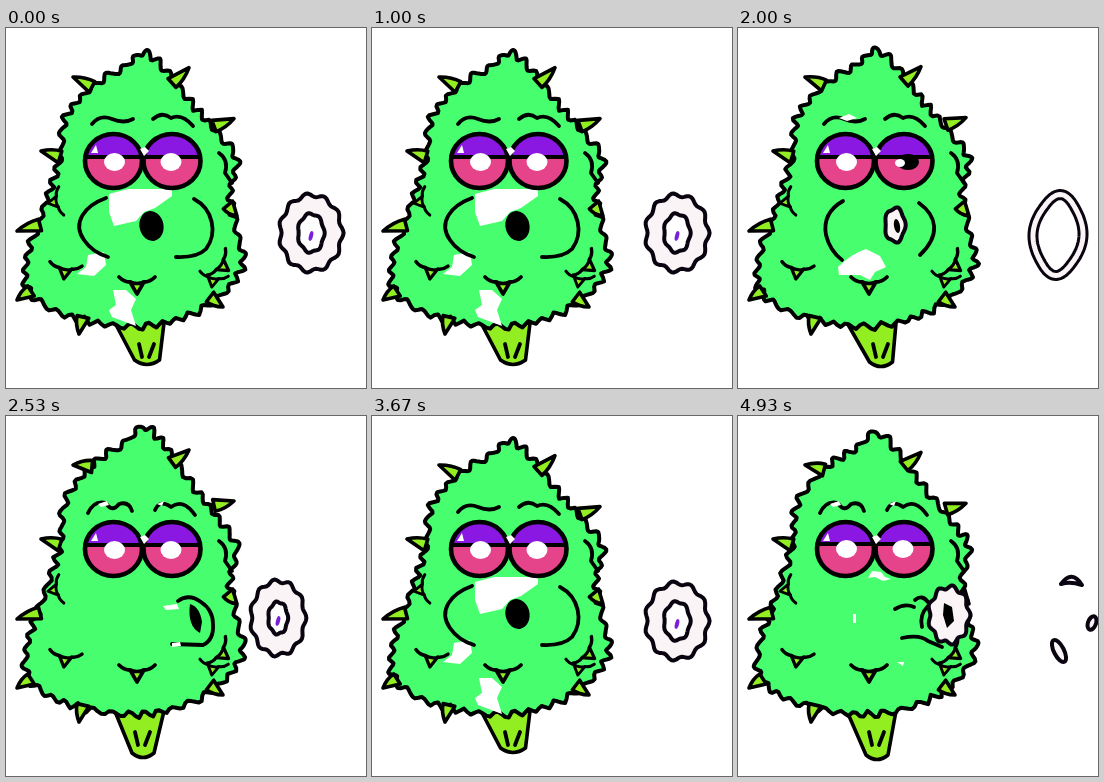
Recreate the animation shown at these times as an HTML page. Size 360 px wide and 360 px high, loop 5 s.

```html
<!DOCTYPE html>
<html lang="en">
<head>
<meta charset="utf-8">
<title>Smoke rings</title>
<style>
html, body { margin: 0; width: 100%; height: 100%; overflow: hidden; background: #fff; }
svg { display: block; width: 100vw; height: 100vh; stroke-linecap: round; stroke-linejoin: round; }
.pose { display: none; }
.pose.on { display: inline; }
.body { fill: #47ff6e; stroke: #000; stroke-width: 4; }
.lime { fill: #92ee20; stroke: #000; stroke-width: 3.6; }
.line { fill: none; stroke: #000; stroke-width: 3.8; }
.white { fill: #fff; }
.smoke { fill: #faf4f6; stroke: #0a0410; stroke-width: 4; fill-rule: evenodd; }
.bead { fill: none; stroke: #0a0410; stroke-width: 11; }
.bead + .bead { stroke: #faf4f6; stroke-width: 5; }
.pink { fill: #e5438a; }
.lid { fill: #8a18e2; }
.rim { fill: none; stroke: #000; stroke-width: 4.6; }
.core { fill: #7a20d8; }
</style>
</head>
<body>
<svg id="stage" viewBox="0 0 360 360"></svg>
<script>
const LOOP = 5000, CYCLE = 908.5, FPS = 15, TAU = 2 * Math.PI;

const path = (cls, d) => `<path class="${cls}" d="${d}"/>`;
const line = d => path('line', d);
const white = d => path('white', d);
const black = d => path('', d);
const poly = pts => 'M' + pts.map(p => p.map(v => v.toFixed(1)).join(' ')).join('L') + 'Z';
const oval = (cls, x, y, rx, ry, turn = 0) =>
  `<ellipse class="${cls}" cx="${x}" cy="${y}" rx="${rx}" ry="${ry}" transform="rotate(${turn} ${x} ${y})"/>`;

// Key points of the silhouette, clockwise from the tip.
const shape = [[138, 23], [158, 39], [187, 76], [217, 111], [231, 132], [224, 168],
  [232, 208], [236, 240], [202, 278], [140, 298], [68, 290], [24, 265],
  [21, 230], [37, 182], [54, 130], [59, 90], [88, 56], [118, 38]];

function spline(keys, steps) {
  const at = i => keys[(i + keys.length) % keys.length];
  return keys.flatMap((_, i) => Array.from({ length: steps }, (_, k) => {
    const t = k / steps;
    return [0, 1].map(c => {
      const [a, b, d, e] = [-1, 0, 1, 2].map(o => at(i + o)[c]);
      return b + t / 2 * (d - a + t * (2 * a - 5 * b + 4 * d - e + t * (3 * (b - d) + e - a)));
    });
  }));
}

// Smooth silhouette with its top lifted and a ruffled edge.
function body(lift, shift) {
  const p = spline(shape, 20).map(([x, y]) => [x, y - lift * Math.max(0, 1 - y / 130)]);
  const next = i => p[(i + 1) % p.length];
  const gaps = p.map(([x, y], i) => Math.hypot(next(i)[0] - x, next(i)[1] - y));
  const total = gaps.reduce((a, b) => a + b);
  let run = 0;
  return path('body', poly(p.map(([x, y], i) => {
    const u = run / total, a = TAU * 50 * u + Math.sin(TAU * 9 * u + shift) + shift;
    const k = (3 + .8 * Math.sin(TAU * 13 * u)) * Math.sin(a + .4 * Math.sin(a)) / gaps[i];
    run += gaps[i];
    return [x + (next(i)[1] - y) * k, y - (next(i)[0] - x) * k];
  })));
}

function leaf(x, y, tx, ty) {
  const len = Math.hypot(tx - x, ty - y), nx = (y - ty) / len * 6, ny = (tx - x) / len * 6;
  return path('lime', `M${x + nx} ${y + ny}Q${(x + tx) / 2 + nx} ${(y + ty) / 2 + ny} ${tx} ${ty}` +
    `L${x - nx} ${y - ny}Z`);
}
const leaves = lift => [
  [86, 58 - lift / 2, 67, 49], [54, 129, 35, 123], [34, 197, 11, 203], [25, 263, 11, 272], [77, 289, 73, 306],
  [166, 54 - lift / 2, 183, 39 - lift / 3], [208, 97 - lift / 2, 228, 90 - lift / 3],
  [222, 177, 231, 188], [204, 269, 217, 279]
].map(v => leaf(...v)).join('');

// Small leaf on the body with a crease on both sides.
const sprout = (x, y, turn, size = 1) => `<g transform="translate(${x} ${y}) rotate(${turn}) scale(${size})">` +
  path('lime', 'M-7 -3Q0 0 7 -3L0 9Z') + line('M-18 -8Q-13 -3 -7 -3M18 -8Q13 -3 7 -3') + '</g>';
const sprouts = sprout(59, 243, 8, .9) + sprout(131, 257, 0) + sprout(49, 174, 80, .8) +
  sprout(216, 238, -55, .9) + sprout(207, 252, 10, .8) + line('M213 125Q223 132 219 145L226 155');

const stem = (foot, y, width = 22) => path('lime',
  `M108 293L${foot - width / 2} ${y - 4}Q${foot} ${y + 5} ${foot + width / 2} ${y - 4}L158 295Z`) +
  line(`M${foot - 8} 316l3 13M${foot + 7} 316l-5 13`);
const plant = (lift, shift, foot, y, width) =>
  stem(foot, y, width) + body(lift, shift) + leaves(lift) + sprouts;

function eye(x, lid, look, pupil) {
  const y = 133, rx = 28.5, ry = 27, dx = rx * Math.sqrt(1 - ((lid - y) / ry) ** 2);
  return oval('pink', x, y, rx, ry) +
    path('lid', `M${x - dx} ${lid}A${rx} ${ry} 0 0 1 ${x + dx} ${lid}Z`) +
    line(`M${x - dx} ${lid}H${x + dx}`) +
    (pupil ? oval('', x + 4, lid + 5, 11, 8) + oval('white', x - 4, lid + 6, 5, 4)
           : oval('white', x + look, lid + 5, 10.5, 9)) +
    oval('rim', x, y, rx, ry);
}
const eyes = (lid, pupil) => eye(107.5, lid, 1, false) + eye(166, lid, -1, pupil) +
  white('M134 121l5-2 4 4-5 5zM85 125l5-8 2 8z');

const browsFlat = line('M86 96Q94 86 106 91T127 91M147 91Q156 83 165 90Q176 85 187 98');
const browsHigh = line('M82 97Q88 84 100 87Q106 97 113 88Q123 85 126 95M149 94Q154 83 165 91Q177 82 189 99') +
  white('M92 88l9-3 2 4-8 2zM151 88l7-3-2 5z');

const wavy = (x, y, rx, ry, lobes, amp = .05) => poly(Array.from({ length: 90 }, (_, i) => {
  const a = i * TAU / 90, r = 1 + amp * Math.cos(lobes * a);
  return [x + rx * r * Math.cos(a), y + ry * r * Math.sin(a)];
}));
const puff = (x, y, rx, ry, lobes) => path('smoke', wavy(x, y, rx, ry, lobes, .07));
const ring = (x, y, rx, ry, hole) =>
  path('smoke', wavy(x, y, rx, ry, 11) + wavy(x, y, rx * hole, ry * hole * 1.2, 7)) +
  oval('core', x, y + 3, 2, 5, 15);

// Worn-out ring: a dark band filled with pale beads.
function beads(x, y, rx, ry, turn, dash) {
  const d = wavy(x, y, rx, ry, 4, .04);
  return `<g transform="rotate(${turn} ${x} ${y})">${path('bead', d)}` +
    `<path class="bead" stroke-dasharray="${dash}" d="${d}"/></g>`;
}

const cheeks = line('M100 170C78 178 66 195 78 212Q86 224 102 229M188 171C207 181 212 205 200 221Q191 230 170 229');
const lips = line('M172 185Q183 177 195 186Q207 194 207 208Q208 224 197 229L166 228') +
  black('M184 188Q194 191 196 206L194 217Q181 210 184 188Z') +
  white('M157 190l14-2 2 5-13 1zM166 227l8-1 1 4-9 1z');

const poses = [
  plant(-2, 0, 141, 336, 25) +
    white('M103 166L122 161H166V168L149 180 138 184 130 193 108 198 103 184Z') +
    white('M82 227L98 224 100 237 88 248 71 246 80 239Z') +
    white('M107 262L120 262 130 271 125 282 130 298 106 289 103 282 110 277Z') +
    browsFlat + eyes(129) + cheeks + oval('', 145.5, 198, 12, 15, -12) +
    ring(305, 205, 31, 38, .42),

  plant(1, 1, 143, 338, 23) +
    white('M100 239Q113 226 128 221L142 228 148 239 137 244 132 252 122 247 101 247Z') +
    browsFlat + white('M101 90l10-4 8 4-10 3z') + eyes(129, true) +
    line('M105 173Q84 185 88 207Q92 223 104 232M181 175C199 188 203 207 182 227') +
    puff(157, 197, 10, 17, 5) + oval('', 159, 198, 3, 7, -10) +
    beads(320, 207, 24, 39, 4, '9 1'),

  plant(1, 2, 139, 344) +
    white('M134 155h9l1 5h-11zM105 179Q96 198 103 220Q99 218 98 206Q98 188 105 179Z') +
    browsHigh + eyes(130) +
    line('M151 195l10-5M153 224l10-5M173 183l9-5M176 224l3 5') +
    puff(185, 202, 17, 21, 7) + black('M181 193l11 9-10 8z') +
    beads(333, 206, 19, 43, 6, '12 6'),

  plant(8, 3, 139, 343) +
    white('M121 163l9-1 4-7 9 1 4 5 6 2-8 2-8-4zM115 198h3v9h-3zM159 246l7 0-1 4z') +
    browsHigh + eyes(128) +
    line('M157 193Q167 187 176 191M177 184Q184 178 190 186M164 222Q182 218 190 225L204 231M190 190Q181 199 184 211') +
    puff(211, 199, 20, 28, 9) + black('M206 187l8 4 2 14-7 7-4-13z') +
    path('smoke', 'M323 168Q334 153 344 169Q332 165 323 168Z') +
    oval('smoke', 354, 207, 4, 7, 20) + oval('smoke', 321, 235, 5, 12, -27),

  plant(12, 4, 136, 341) +
    white('M187 150l6 14h5v13h-14l-3-9 5-3zM121 205h4l1 10h-4z') +
    browsHigh + eyes(129) + lips + puff(251, 199, 24, 36, 9) +
    black('M246 177l10 4 1 14 5 10-5 14-10-4-3-16 5-9z') + oval('core', 252, 202, 3, 6, -14),

  plant(15, 5, 137, 341) + browsHigh + eyes(129) + lips + ring(272, 202, 27, 37, .36),

  plant(10, 6, 139, 339) + browsFlat + eyes(129) +
    line('M101 176Q83 186 84 205Q88 221 103 227M186 175C202 184 207 207 190 226') +
    oval('', 155, 199, 12, 16, -8) + ring(291, 204, 30, 38, .4)
];

const stage = document.getElementById('stage');
stage.innerHTML = poses.map(p => `<g class="pose">${p}</g>`).join('');
const groups = [...stage.children];
let shown = -1;

function draw(time) {
  const step = Math.floor((time % LOOP + 4) * FPS / 1000) % (LOOP * FPS / 1000);
  const phase = step * 1000 / FPS % CYCLE;
  const pose = Math.floor(phase / CYCLE * poses.length);
  if (pose === shown) return;
  groups.forEach((g, i) => g.classList.toggle('on', i === pose));
  shown = pose;
}
const start = performance.now();
function tick() {
  draw(performance.now() - start);
  requestAnimationFrame(tick);
}
tick();
</script>
</body>
</html>
```
